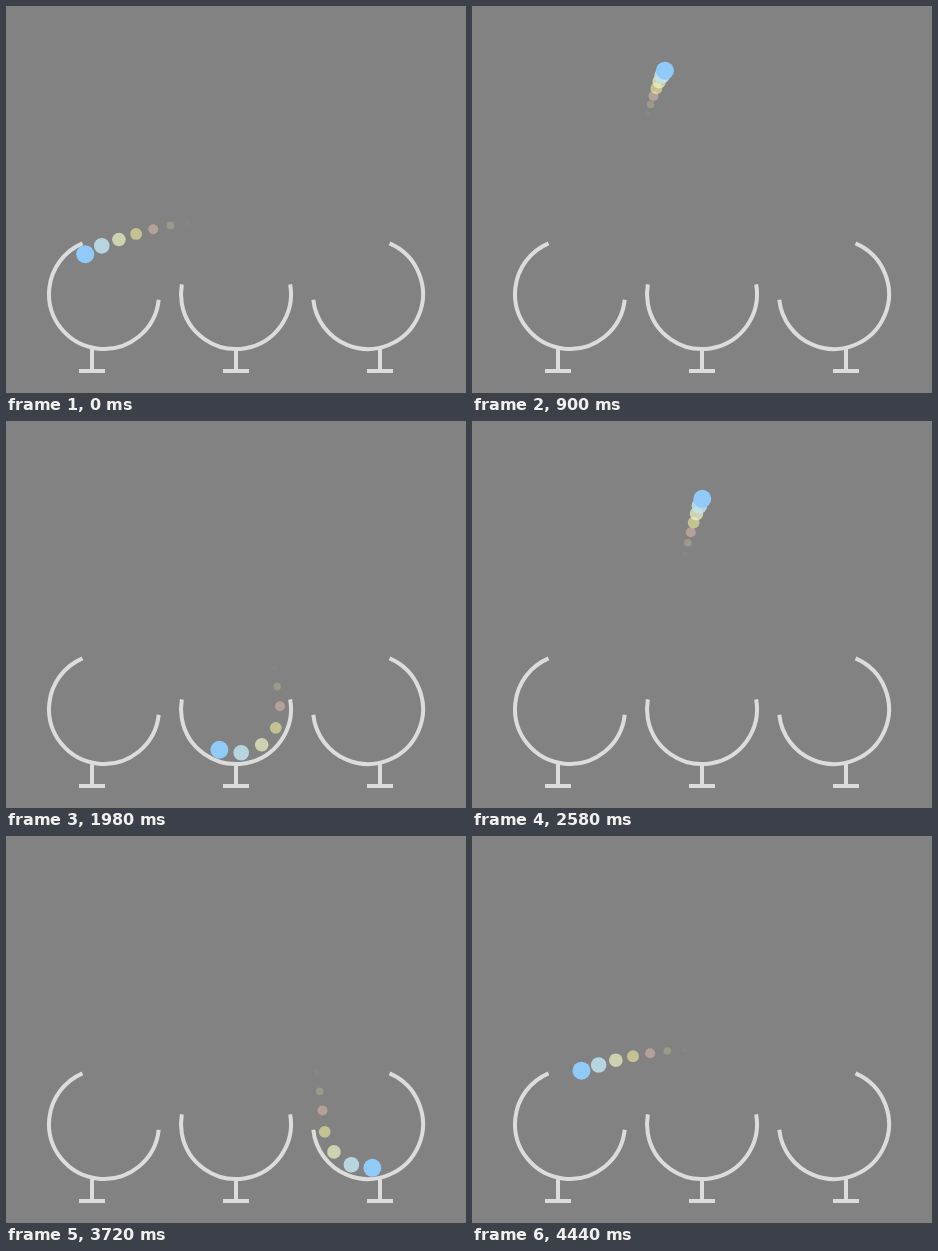
Recreate the animation shown at these times as an HTML page with a canvas. Size 460 by 387 pixels, loop 4.5 s.

```html
<!DOCTYPE html>
<html lang="en">
<head>
<meta charset="utf-8">
<title>Juggling cups</title>
<style>
  html, body { margin: 0; width: 100%; height: 100%; overflow: hidden; background: #828282; }
  canvas { display: block; width: 460px; height: 387px; }
</style>
</head>
<body>
<canvas id="stage" width="460" height="387"></canvas>
<script>
const ctx = document.getElementById('stage').getContext('2d');
const LOOP = 4500, STEP = 60, TRAIL_DELAY = 100 / 3;
const CUP_Y = 288, CUP_RADIUS = 55, ROLL_RADIUS = 44;
const HALF_GRAVITY = 392; // px/s²

const rad = deg => deg * Math.PI / 180;

// Rolling inside a cup; bend makes the ball start faster (+) or slower (-).
const roll = (start, end, cupX, from, to, bend = 0) => ({
  end,
  at(t) {
    const u = (t - start) / (end - start);
    const angle = rad(from + (to - from) * (u + bend * 4 * u * (1 - u)));
    return [cupX + ROLL_RADIUS * Math.cos(angle), CUP_Y + ROLL_RADIUS * Math.sin(angle)];
  }
});

// Ballistic flight, described around its highest point.
const flight = (end, peakTime, peakX, peakY, speed) => ({
  end,
  at(t) {
    const s = (t - peakTime) / 1000;
    return [peakX + speed * s, peakY + HALF_GRAVITY * s * s];
  }
});

const path = [
  roll(0, 304, 98, 244.7, -2.5, -0.025),
  flight(1848, 1076, 208, 52.5, 85.7),
  roll(1848, 2061, 230, -2.5, 182.5),
  flight(3605.5, 2834, 252, 52.5, 85.7),
  roll(3605.5, 3912, 362, 182.5, -64.7, 0.025),
  flight(LOOP, 4206, 230, 213.2, -515)
];

// Head first, then the fading trail.
const balls = [
  { radius: 9, color: '#90caf9', alpha: 1 },
  { radius: 7.8, color: '#c0e4ee', alpha: 0.85 },
  { radius: 6.8, color: '#f0f4c3', alpha: 0.7 },
  { radius: 5.9, color: '#fbf5a0', alpha: 0.55 },
  { radius: 5, color: '#ffd0b8', alpha: 0.4 },
  { radius: 3.8, color: '#e6e49c', alpha: 0.25 },
  { radius: 2.7, color: '#c8aaaa', alpha: 0.1 }
];

const cups = [
  { x: 98, stem: 86, from: 6, to: 247 },
  { x: 230, stem: 230, from: -10, to: 190 },
  { x: 362, stem: 374, from: -67, to: 174 }
];

function position(time) {
  const t = (time + LOOP) % LOOP;
  return path.find(part => t < part.end).at(t);
}

function drawCup({ x, stem, from, to }) {
  ctx.beginPath();
  ctx.arc(x, CUP_Y, CUP_RADIUS, rad(from), rad(to));
  ctx.moveTo(stem, 342);
  ctx.lineTo(stem, 365);
  ctx.moveTo(stem - 13, 365);
  ctx.lineTo(stem + 13, 365);
  ctx.stroke();
}

function drawBall({ radius, color, alpha }, time) {
  const [x, y] = position(time);
  ctx.globalAlpha = alpha;
  ctx.fillStyle = color;
  ctx.beginPath();
  ctx.arc(x, y, radius, 0, 2 * Math.PI);
  ctx.fill();
}

function draw(time) {
  ctx.globalAlpha = 1;
  ctx.fillStyle = '#828282';
  ctx.fillRect(0, 0, 460, 387);
  ctx.strokeStyle = '#dcdcdc';
  ctx.lineWidth = 4;
  cups.forEach(drawCup);
  for (let i = balls.length - 1; i >= 0; i--) drawBall(balls[i], time - i * TRAIL_DELAY);
}

let origin;
function tick(now) {
  origin ??= now;
  const elapsed = Math.max(0, now - origin) % LOOP;
  draw(Math.floor(elapsed / STEP) * STEP);
  requestAnimationFrame(tick);
}
draw(0);
requestAnimationFrame(tick);
</script>
</body>
</html>
```
